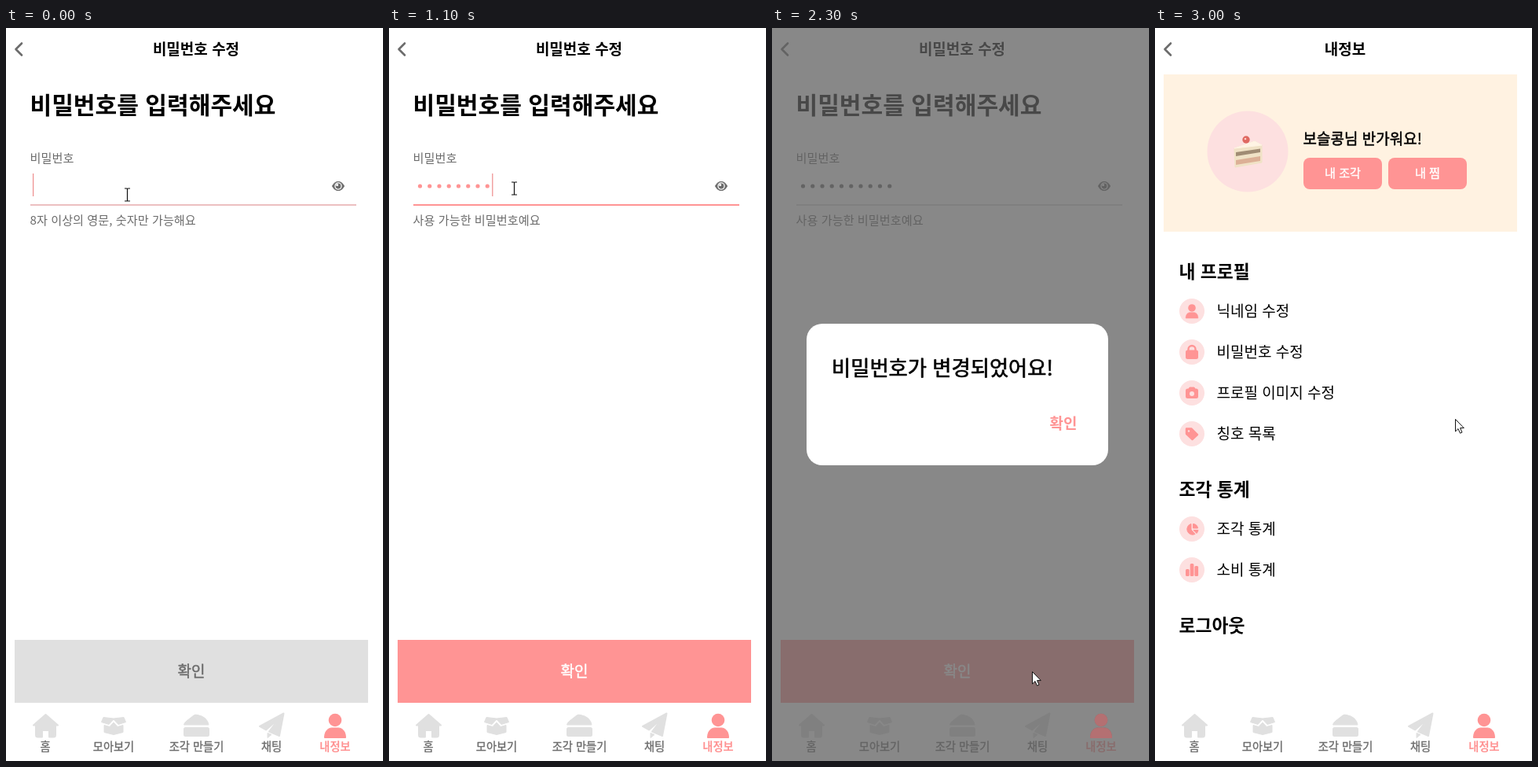
An HTML page for the animation above (3.1 s loop, 480 by 932 pixels).

```html
<!DOCTYPE html>
<html lang="ko">
<head>
<meta charset="utf-8">
<title>비밀번호 수정</title>
<style>
  html, body { margin: 0; width: 100%; height: 100%; overflow: hidden; background: #fff; }
  svg { display: block; width: 480px; height: 932px; }
  text { font-family: "Noto Sans CJK KR", "Noto Sans KR", "Noto Sans CJK", sans-serif; white-space: pre; }
  /* A hairline outline gives the medium weight. */
  .medium { stroke-width: .026em; stroke-linejoin: round; }
</style>
</head>
<body>
<svg id="stage" viewBox="0 0 480 932"></svg>
<script>
const PINK = '#ff9494', GRAY = '#6c6c6c', PALE = '#e0e0e0', BLUSH = '#fde0e0';
const LOOP = 3100, STEP = 100;
const SMALL = 14.25, BODY = 15.2, LARGE = 19, SECTION = 22.8;

// Text is placed by the vertical middle of its glyphs.
const label = (str, x, midY, size, { fill = '#000', weight = 400, anchor = 'start', id = '' } = {}) => {
  const medium = weight === 500;
  return `<text id="${id}" x="${x}" y="${midY + size * 0.36}" font-size="${size}" fill="${fill}"
    ${medium ? `class="medium" stroke="${fill}"` : `font-weight="${weight}"`} text-anchor="${anchor}">${str}</text>`;
};
const rect = (x, y, w, h, fill, r = 0, id = '') =>
  `<rect id="${id}" x="${x}" y="${y}" width="${w}" height="${h}" rx="${r}" fill="${fill}"/>`;
const circle = (x, y, r, fill) => `<circle cx="${x}" cy="${y}" r="${r}" fill="${fill}"/>`;
const shape = (d, fill, soften = 1) =>
  `<path d="${d}" fill="${fill}" stroke="${fill}" stroke-width="${soften}" stroke-linejoin="round"/>`;
const group = (id, body) => `<g id="${id}">${body}</g>`;
const centered = (fill, weight) => ({ fill, weight, anchor: 'middle' });

const heading = str => label(str, 242, 27, LARGE, centered('#000', 700));
const person = (x, y, s, fill) =>
  `<g transform="translate(${x} ${y}) scale(${s})">${circle(0, -7, 8.3, fill)}
   ${shape('M-13.5 15.5C-13.5 7-9 3-4 3H4C9 3 13.5 7 13.5 15.5Z', fill)}</g>`;
const myIcon = fill => person(419, 887, 1, fill);

const backArrow = `<path d="M20 19.5L12.5 27L20 34.5" fill="none" stroke="${GRAY}" stroke-width="2.6"
  stroke-linecap="round" stroke-linejoin="round"/>`;

const eye = shape('M415.5 201C418.5 193.5 427.5 193.5 430.5 201C427.5 208.5 418.5 208.5 415.5 201Z', GRAY) +
  circle(423, 201, 4.7, '#fff') + circle(423, 201, 3.4, GRAY) + circle(421.6, 199.5, 1.5, '#fff');

const nav = [
  shape('M50.5 873L66 886.5H63V899Q63 901.5 60.5 901.5H55V893H46V901.5H40.5Q38 901.5 38 899V886.5H35Z', PALE, 2),
  shape('M124 876.5L137 878L150 876.5L152.5 882.5L143 885.5L137 879L131 885.5L121.5 882.5Z', PALE),
  shape('M125 886.5L132 888.5L137 883L142 888.5L149 886.5V895.5L137 898.5L125 895.5Z', PALE),
  shape('M226.5 886Q227 883 230 881L239 874Q241 872.5 244 873.5Q256.5 876 258 886Z', PALE),
  rect(226, 889, 33, 12, PALE, 2.5),
  shape('M353.5 871.5L323 888L331 892.5L348 877.5L335 894.5L348 900Z', PALE, 2),
  shape('M333 896.5V902.5L338 898.5Z', PALE),
  ...[['홈', 50], ['모아보기', 137], ['조각 만들기', 242.5], ['채팅', 338]]
    .map(([name, x]) => label(name, x, 914, SMALL, centered(GRAY, 500))),
  myIcon(PINK),
  label('내정보', 419, 914, SMALL, centered(PINK, 700))
].join('');

const dots = Array.from({ length: 10 }, (_, i) => `<circle cx="${39.5 + i * 12.25}" cy="201" r="2.6"/>`).join('');

const form = heading('비밀번호 수정') +
  label('비밀번호를 입력해주세요', 30.5, 98, 30.1, { weight: 700 }) +
  label('비밀번호', 30.5, 166, BODY, { fill: GRAY }) +
  group('dots', dots) + rect(34, 185, 1.2, 29, '#ee8c8c', 0, 'caret') + eye +
  rect(31, 224, 415, 2, PINK, 0, 'underline') +
  label('', 30.5, 245, BODY, { fill: GRAY, id: 'hint' }) +
  rect(11, 778, 450, 80, PALE, 0, 'button') +
  label('확인', 236, 818, LARGE, { ...centered(GRAY, 500), id: 'buttonText' });

const cake = shape('M101 153L127 144L136 149V171L102 177Z', '#f0e2c6') +
  shape('M101 153L127 144L136 149Z', '#fff4e4') +
  shape('M103 158L134 153.5V158L103 163Z', '#a08c74', 0) +
  shape('M103 168L134 163V169L103 174Z', '#dcb096', 0) +
  circle(116, 142, 4.7, '#df6961') + circle(115, 141, 1.3, '#ffd0c8');

const rows = [
  [360, '닉네임 수정', person(47, 360, 0.58, PINK)],
  [412, '비밀번호 수정', rect(39, 409.5, 16, 11.5, PINK, 2.5) +
    `<path d="M42.5 411V408.5a4.5 4.5 0 0 1 9 0V411" fill="none" stroke="${PINK}" stroke-width="2.4"/>`],
  [464, '프로필 이미지 수정', rect(39, 458.5, 16, 12.5, PINK, 2.5) +
    shape('M43 459L44 457H50L51 459Z', PINK) + circle(47, 465, 3, BLUSH)],
  [516, '칭호 목록', shape('M40 509.5H46.5L54 517L47.5 523L40 516Z', PINK, 2.4) + circle(43, 512.5, 1.2, BLUSH)],
  [637, '조각 통계', shape('M46 630.5V638L51 643.5A7 7 0 1 1 46 630.5Z', PINK) +
    shape('M48.5 630.5A6.5 6.5 0 0 1 54.5 636H48.5Z', PINK) + shape('M49 638.5H55Q54.5 641 53 642.5Z', PINK)],
  [689, '소비 통계', rect(39, 688, 4.7, 9, PINK, 1.5) + rect(44.7, 681, 4.7, 16, PINK, 1.5) +
    rect(50.4, 684, 4.7, 13, PINK, 1.5)]
];

const profile = heading('내정보') + rect(11, 59, 450, 200, '#fff2e1') +
  circle(118, 157, 51.5, BLUSH) + cake +
  label('보슬콩님 반가워요!', 188.5, 141, LARGE, { weight: 500 }) +
  [['내 조각', 189], ['내 찜', 297]].map(([str, x]) =>
    rect(x, 165, 100, 40, PINK, 8) + label(str, x + 50, 185, BODY, centered('#fff', 500))).join('') +
  [['내 프로필', 310], ['조각 통계', 587], ['로그아웃', 760]]
    .map(([str, y]) => label(str, 30.5, y, SECTION, { weight: 700 })).join('') +
  rows.map(([y, str, icon]) => circle(47, y, 16, BLUSH) + icon + label(str, 78.5, y, LARGE)).join('');

const modal = '<rect width="480" height="932" fill="#606060" opacity=".75"/>' + myIcon('#b47072') +
  rect(44, 376, 384, 180, '#fff', 20) +
  label('비밀번호가 변경되었어요!', 76, 433, 26.3, { weight: 500 }) +
  label('확인', 371, 503, LARGE, centered(PINK, 700));

const beam = `<path d="M-3.5 -8H-1Q0 -8 0 -7Q0 -8 1 -8H3.5M0 -7.5V7.5M-3.5 8H-1Q0 8 0 7Q0 8 1 8H3.5"
  fill="none" stroke="#111" stroke-width="1.2"/>`;
const arrow = `<path d="M.5 .5V16L4 12.6L6.5 18.2L9 17.1L6.6 11.6H11.3Z" fill="#fff" stroke="#111"/>`;

document.getElementById('stage').innerHTML =
  `<defs><linearGradient id="fade" gradientUnits="userSpaceOnUse" x1="31" x2="446">
    <stop stop-color="#f8b9ae"/><stop offset=".37" stop-color="#f1c4bb"/>
    <stop offset=".4" stop-color="#dcdcdc"/></linearGradient></defs>` +
  backArrow + group('form', form) + group('profile', profile) + nav + group('modal', modal) +
  group('beam', beam) + group('arrow', arrow);

const el = id => document.getElementById(id);
const set = (id, attrs) => Object.entries(attrs).forEach(([k, v]) => el(id).setAttribute(k, v));
const show = (id, on) => set(id, { display: on ? 'inline' : 'none' });
const progress = (t, from, to) => {
  const p = Math.min(1, Math.max(0, (t - from) / (to - from)));
  return p * p * (3 - 2 * p);
};

// Pointer legs: [start, end, dx, dy].
const legs = [[0, 300, 5, -8], [1400, 2000, 172, 614], [2300, 2800, 51, -321]];
const pointerAt = t => legs.reduce(([x, y], [from, to, dx, dy]) => {
  const p = progress(t, from, to);
  return [x + dx * p, y + dy * p];
}, [154, 212]);

function underlineColor(t) {
  if (t < 100) return '#ecbfc1';
  if (t < 200) return '#f6a7a8';
  if (t < 2200) return PINK;
  return t < 2300 ? 'url(#fade)' : '#dcdcdc';
}

function render(t) {
  const typed = Math.max(0, Math.min(10, Math.round((t - 600) * 0.016)));
  const valid = typed >= 8;
  const done = t >= 2900;
  show('form', !done);
  show('profile', done);
  show('modal', t >= 2300 && !done);

  [...el('dots').children].forEach((dot, i) => dot.setAttribute('display', i < typed ? 'inline' : 'none'));
  set('dots', { fill: t < 2200 ? PINK : t < 2300 ? '#986b6a' : GRAY });
  set('caret', { x: 34 + typed * 12.15 });
  show('caret', t < 600 || (t >= 700 && t < 1700));
  set('underline', { fill: underlineColor(t) });
  el('hint').textContent = valid ? '사용 가능한 비밀번호예요' : '8자 이상의 영문, 숫자만 가능해요';
  const ink = valid ? '#fff' : GRAY;
  set('button', { fill: valid ? PINK : PALE });
  set('buttonText', { fill: ink, stroke: ink });

  const [x, y] = pointerAt(t);
  const overField = y < 226;
  show('beam', overField);
  show('arrow', !overField);
  set(overField ? 'beam' : 'arrow', { transform: `translate(${Math.round(x) + (overField ? 0.5 : 0)} ${Math.round(y)})` });
}

function frame() {
  const t = performance.now() % LOOP;
  render(Math.floor(t / STEP) * STEP);
  requestAnimationFrame(frame);
}
frame();
</script>
</body>
</html>
```
